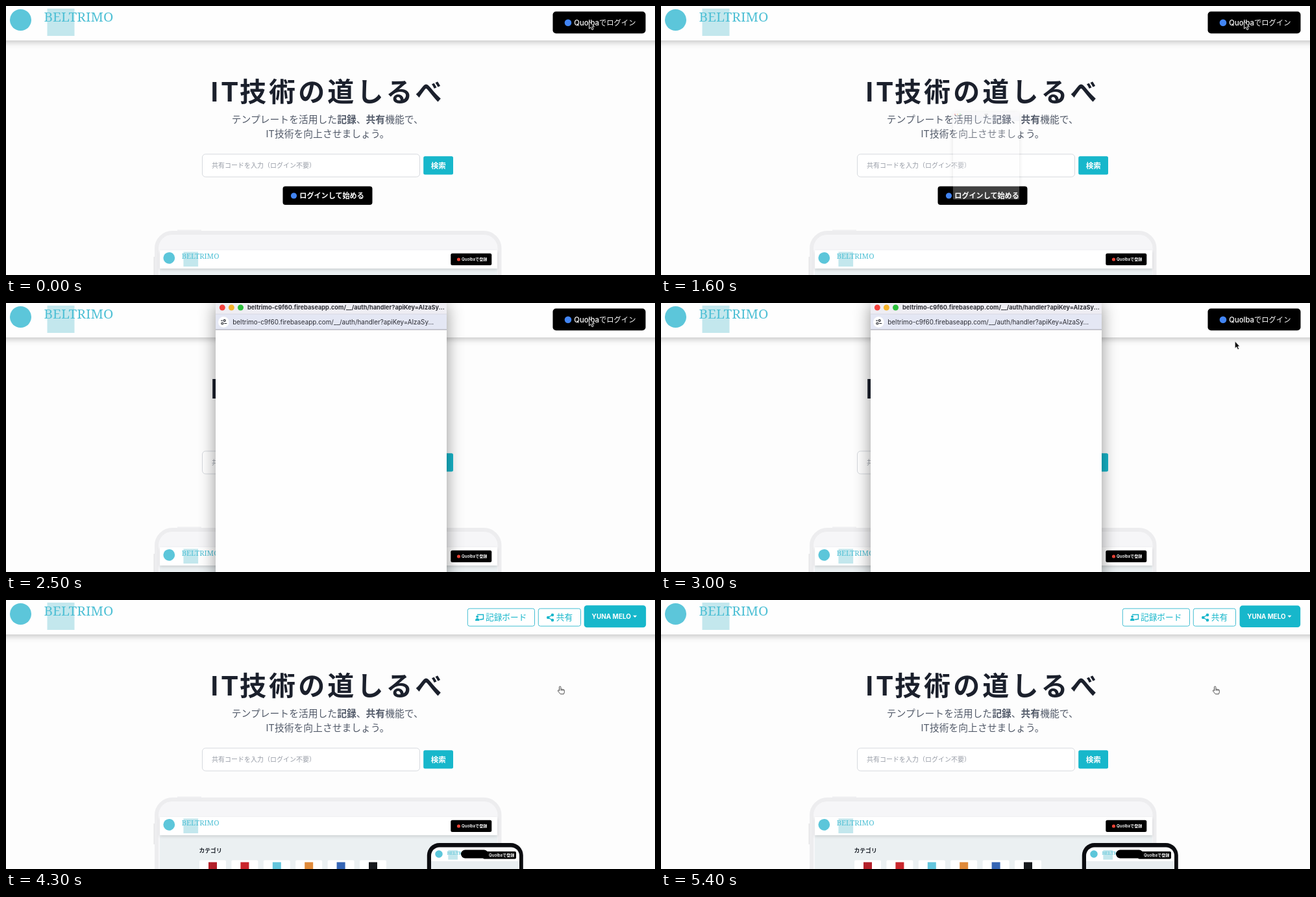
Animation of 1000 by 414 pixels, one loop 5.5 s. Source, as an HTML page:

```html
<!DOCTYPE html>
<html lang="ja">
<head>
<meta charset="utf-8">
<style>
html, body { margin: 0; height: 100%; overflow: hidden; background: #fdfdfd; }
svg { display: block; width: 100vw; height: 100vh; font-family: Inter, "Noto Sans CJK JP", sans-serif; }
.b { font-weight: 700; }
.mid { text-anchor: middle; }
.w { fill: #fff; }
.teal { fill: #17b7cb; }
.line { fill: #fff; stroke: #45bfd3; }
.bar { filter: drop-shadow(0 3px 5px rgba(0,0,0,.22)); }
.thin { filter: drop-shadow(0 2px 2px rgba(0,0,0,.13)); }
#popup { filter: drop-shadow(0 6px 13px rgba(0,0,0,.42)); transform-origin: 501px 231px; }
</style>
</head>
<body>
<svg viewBox="0 0 1000 414" preserveAspectRatio="none">
<defs>
  <g id="logo">
    <circle r="16.5" fill="#5cc6da"/>
    <rect x="41" y="-17.5" width="42" height="42" fill="#c3e7ed"/>
    <text x="36" y="2.5" font-size="20.8" font-family="Noto Serif, serif" fill="#4fc0d5">BELTRIMO</text>
  </g>
</defs>
<rect width="1000" height="414" fill="#fdfdfd"/>

<!-- Hero -->
<g class="b" font-size="41" letter-spacing="4.1" fill="#1b202c">
  <text x="315.5" y="147">IT</text><text x="360" y="147">技術の道しるべ</text>
</g>
<g font-size="14.8" fill="#525a69">
  <text x="347.8" y="179.7">テンプレートを活用した<tspan class="b">記録</tspan>、<tspan class="b">共有</tspan>機能で、</text>
  <text x="400.4" y="202.4">IT技術を向上させましょう。</text>
</g>
<rect x="302.5" y="228" width="335" height="35" rx="5" fill="#fff" stroke="#d6d9de"/>
<text x="317" y="248.8" font-size="10" fill="#979ca6">共有コードを入力（ログイン不要）</text>
<rect class="teal" x="643.2" y="231.2" width="45.8" height="28.4" rx="2.5"/>
<text class="b w mid" x="666.3" y="249.8" font-size="11.6">検索</text>
<g id="start">
  <rect x="426.5" y="277.5" width="138" height="28.5" rx="4"/>
  <circle cx="443.5" cy="292" r="4.6" fill="#4285f4"/>
  <text class="b w" x="452.3" y="296" font-size="11.1">ログインして始める</text>
</g>

<!-- Device mock-up -->
<g id="mock">
  <rect x="264" y="302.5" width="37" height="3" fill="#f0f0f2"/>
  <rect x="227.5" y="344" width="3" height="32" fill="#e6e6e8"/>
  <rect x="232" y="307" width="528.5" height="160" rx="24" fill="#f6f6f8" stroke="#ededef" stroke-width="6"/>
  <rect x="237" y="334" width="520" height="100" fill="#ebf0f2"/>
  <rect class="thin w" x="237" y="334" width="520" height="28"/>
  <use href="#logo" transform="translate(251.3 345.8) scale(.54)"/>
  <rect x="685.3" y="338.7" width="63" height="18.2" rx="2.5"/>
  <circle cx="697.5" cy="348" r="2.6" fill="#ea4335"/>
  <text x="702" y="350.4" font-size="6.1" font-weight="600" class="w">Quolbaで登録</text>
  <text class="b" x="297.5" y="389.3" font-size="8.8" fill="#20262e">カテゴリ</text>
  <g id="cards"></g>
  <rect x="648.8" y="374" width="148" height="90" rx="19" fill="#0b0c10"/>
  <rect class="w" x="655" y="380.5" width="136" height="80" rx="13"/>
  <use href="#logo" transform="translate(667 391) scale(.35)"/>
  <rect x="735" y="387" width="51" height="11.5" rx="2"/>
  <text x="744" y="395" font-size="6.1" font-weight="600" class="w">Quolbaで登録</text>
  <rect x="655" y="402" width="136" height="12" fill="#e9eef1"/>
  <rect x="701" y="384.5" width="42" height="13" rx="6.5"/>
</g>

<!-- Header -->
<rect class="bar" x="-20" y="-20" width="1040" height="73" fill="#fefefe"/>
<use href="#logo" x="22.5" y="21.5"/>
<g id="login">
  <rect x="842.5" y="8.5" width="143" height="33.7" rx="5"/>
  <circle cx="866" cy="25.7" r="5.3" fill="#4285f4"/>
  <text class="w" x="875.3" y="29.5" font-size="11.3" font-weight="500">Quolbaでログイン</text>
</g>
<g id="menu">
  <rect class="line" x="711.3" y="13.2" width="103.2" height="27" rx="3"/>
  <path d="M726 22.5h9.5v7h-3M729.5 30h4" fill="none" stroke="#17b4ca" stroke-width="1.4"/>
  <path class="teal" d="M723 32q0-4 3.2-4t3.2 4z"/><circle class="teal" cx="726.2" cy="25.6" r="1.9"/>
  <text class="teal" x="739" y="31.4" font-size="12.7">記録ボード</text>
  <rect class="line" x="820.3" y="13.2" width="65.2" height="27" rx="3"/>
  <path d="M842 23l-7 4 7 4" fill="none" stroke="#17b4ca" stroke-width="1.4"/>
  <g class="teal"><circle cx="842" cy="23" r="2.3"/><circle cx="835.3" cy="27" r="2.3"/><circle cx="842" cy="31" r="2.3"/></g>
  <text class="teal" x="847.8" y="31.4" font-size="12.7">共有</text>
  <g id="user">
    <rect class="teal" x="891.6" y="8.6" width="93.6" height="33.4" rx="4.5"/>
    <text class="b w" x="903.3" y="28.9" font-size="9.8">YUNA MELO</text>
    <path class="w" d="M965.5 23.8h6l-3 3.2z"/>
  </g>
</g>

<!-- Popup window -->
<g id="popup">
  <rect x="323" y="-4" width="356" height="468" rx="6" fill="#fefefe"/>
  <path d="M323 17V2q0-6 6-6h344q6 0 6 6v15z" fill="#eeedf3"/>
  <rect x="323" y="17" width="356" height="24" fill="#e4e7f4"/>
  <path d="M323 17h356" stroke="#d4d5de" stroke-width=".8"/>
  <path d="M323 41h356" stroke="#9b9ca6"/>
  <circle cx="333.3" cy="7" r="4.5" fill="#f4433f"/>
  <circle cx="347.4" cy="7" r="4.5" fill="#f5b32b"/>
  <circle cx="361.5" cy="7" r="4.5" fill="#2bbf3c"/>
  <circle class="w" cx="335.3" cy="29.4" r="8.3"/>
  <g fill="none" stroke="#2a2c33" stroke-width="1.2">
    <path id="info" d="M335.3 24.9a4.5 4.5 0 1 0 .01 0M335.3 28.8v3M335.3 26.6v1"/>
    <path id="tune" d="M331 27.3h2.5M336 31.7h4M334.9 27.3a1.5 1.5 0 1 0 3 0a1.5 1.5 0 1 0-3 0M331.5 31.7a1.5 1.5 0 1 0 3 0a1.5 1.5 0 1 0-3 0" transform="translate(.3 -.2)"/>
  </g>
  <text id="title" class="b" y="10.2" fill="#303138"></text>
  <text id="url" x="349.3" y="33" font-size="9.9" fill="#2c2d35"></text>
  <g id="load">
    <rect x="323" y="41.5" width="356" height="3.7" fill="#c5c1ea"/>
    <rect id="seg" y="41.5" width="142" height="3.7" fill="#3b43b4"/>
  </g>
</g>

<!-- Pointer -->
<path id="arrow" d="M0 0V11.5L2.7 9.2L4.5 13.2L6.6 12.2L4.8 8.4H8z" fill="#111" stroke="#fff" stroke-width=".9"/>
<path id="hand" transform="translate(849.3 132.2) scale(1 .93)" d="M3.2 8.2V2.2q0-1.4 1.2-1.4t1.2 1.4V5.4q1-.6 1.8.3q1-.5 1.7.4q1.8-.4 1.9 1.3V10q0 1.5-1 3.5H5Q3.5 11.5 1.3 8.7Q.6 7.2 2 7zM5.6 5.4V8M7.4 5.8V8M9.1 6.2V8" fill="#fff" stroke="#444" stroke-width="1"/>
</svg>
<script>
const $ = id => document.getElementById(id);
const show = (id, on) => $(id).style.display = on ? '' : 'none';
const host = 'beltrimo-c9f60.firebaseapp.com/__/auth/handler?';

$('cards').innerHTML = ['#b3202a', '#c9262c', '#63c5dc', '#e08a3a', '#3565b5', '#17191c'].map((c, i) => {
  const x = 298 + i * 49.4;
  return `<rect class="w" x="${x}" y="400.5" width="41" height="30" rx="2"/>` +
    `<rect x="${x + 14}" y="403.5" width="13" height="13" fill="${c}"/>`;
}).join('');

function setTitle(text, url, x, size) {
  $('title').textContent = text;
  $('title').setAttribute('x', x);
  $('title').setAttribute('font-size', size);
  $('url').textContent = url;
}

function draw(t) {
  const signedIn = t >= 4300;
  show('login', !signedIn);
  show('start', !signedIn);
  show('menu', signedIn);
  $('mock').setAttribute('transform', `translate(0 ${signedIn ? 0 : 42})`);
  const grow = t < 4500 ? 1.02 : 1;
  $('user').setAttribute('transform', `translate(938.5 25.3) scale(${grow}) translate(-938.5 -25.3)`);

  // Window zooms in, then fades when closed
  show('popup', t >= 1600 && t < 4200);
  const [scale, alpha] = t < 1700 ? [.287, .25] : t < 1800 ? [.86, .85] : [1, t < 4100 ? 1 : .4];
  $('popup').style.transform = `scale(${scale})`;
  $('popup').style.opacity = alpha;
  const blank = t < 2000;
  show('info', blank);
  show('tune', !blank);
  if (blank) setTitle('無題', 'about:blank', 492, 8.8);
  else if (t < 3400) setTitle(host + 'apiKey=AIzaSy...', host + 'apiKey=AIzaSy...', 372, 9.2);
  else setTitle(host + 'state=AMbdm...', host + 'state=AMbdmD...', 372, 9.2);
  show('load', t >= 3900);
  $('seg').setAttribute('x', 370 + (t - 3900) * .6);

  const p = Math.min(1, Math.max(0, (t - 2900) / 400));
  const e = 1 - (1 - p) ** 1.35;
  $('arrow').setAttribute('transform', `translate(${898.5 - 44.5 * e} ${23.5 + 109 * e})`);
  show('arrow', !signedIn);
  show('hand', signedIn);
}

let start;
function tick(now) {
  start ??= now;
  draw(Math.floor((now - start) % 5500 / 100) * 100);
  requestAnimationFrame(tick);
}
draw(0);
requestAnimationFrame(tick);
</script>
</body>
</html>
```
